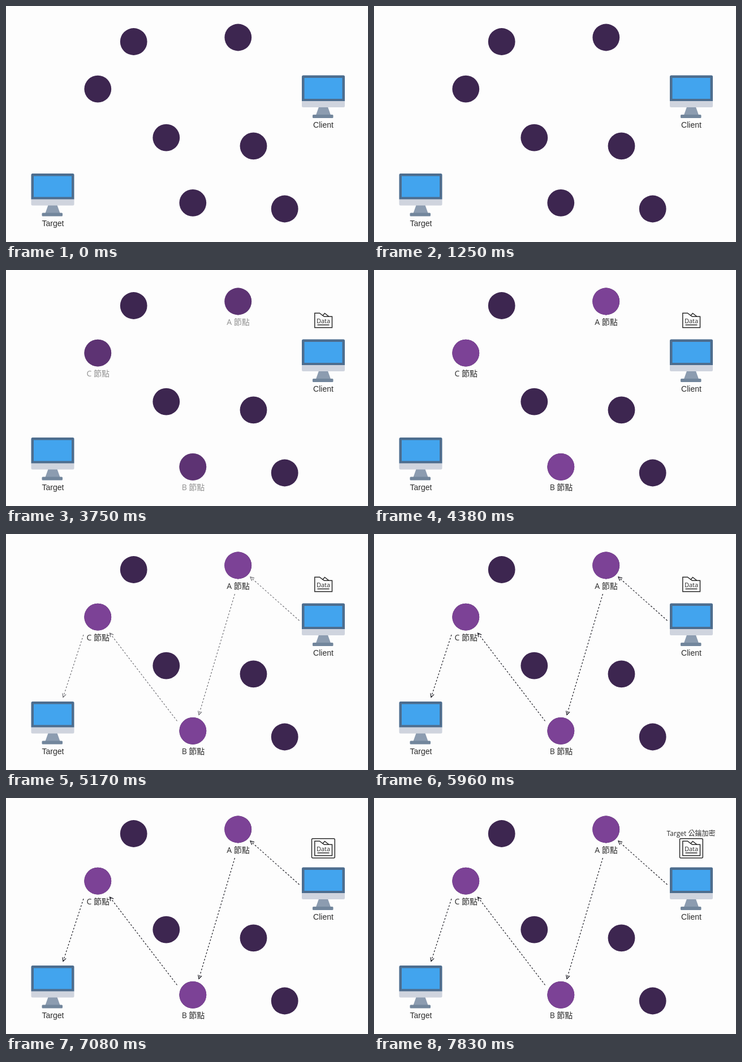
Recreate the animation shown at these times as an HTML page. Size 640 px wide and 417 px high, loop 8000 ms.

```html
<!DOCTYPE html>
<html lang="zh-Hant">
<head>
<meta charset="utf-8">
<title>Relay route</title>
<style>
  html, body { margin: 0; width: 100%; height: 100%; overflow: hidden; background: #fdfdfd; }
  svg { display: block; width: 100vw; height: 100vh; }
  text { fill: #2b2b2b; text-anchor: middle; }
  .host { font: 14px "Liberation Sans", Arial, sans-serif; }
  .node { font: 14px "Open Sans", "Noto Sans CJK TC", "Noto Sans CJK", sans-serif; }
  .key { font: 12px "Open Sans", "Noto Sans CJK TC", "Noto Sans CJK", sans-serif; }
  .data { font: 11px "Open Sans", sans-serif; }
  .line { fill: none; stroke: #2b2b2b; stroke-width: 1.5; }
  .route { fill: none; stroke: #1c1c24; stroke-width: 1.2; }
  .dash { stroke-dasharray: 3 3; }
  .idle { fill: #3d2650; }
  .chosen { fill: #7c4296; }

  .fade { animation: 8s linear infinite both; }
  .file { animation-name: file; }
  .relays { animation-name: relays; }
  .path { animation-name: path; }
  .wrap { animation-name: wrap; }
  .caption { animation-name: caption; }
  @keyframes file { 0%, 23.7% { opacity: 0 } 30.7%, 100% { opacity: 1 } }
  @keyframes relays { 0%, 43.3% { opacity: 0 } 50.3%, 100% { opacity: 1 } }
  @keyframes path { 0%, 60.3% { opacity: 0 } 67.3%, 100% { opacity: 1 } }
  @keyframes wrap { 0%, 76% { opacity: 0 } 83%, 100% { opacity: 1 } }
  @keyframes caption { 0%, 90.8% { opacity: 0 } 97.8%, 100% { opacity: 1 } }
</style>
</head>
<body>
<svg viewBox="0 0 640 417">
  <defs>
    <g id="computer">
      <path fill="#8c9cb0" d="M30 56H46L51 70H25Z"/>
      <rect fill="#72869c" x="19" y="69.5" width="36.5" height="6" rx="1.5"/>
      <path fill="#cfd4de" d="M0 45H76V54Q76 56.5 73.5 56.5H2.5Q0 56.5 0 54Z"/>
      <path fill="#4d6d8e" d="M0 45.5V2.5Q0 0 2.5 0H73.5Q76 0 76 2.5V45.5Z"/>
      <rect fill="#42a4ee" x="4.5" y="4.5" width="67" height="37"/>
    </g>
    <circle id="disc" r="23.9"/>
    <path id="head" class="route" d="M-6.5 -3.3L0 0L-6.5 3.3"/>
  </defs>

  <use href="#computer" x="523" y="122.5"/>
  <text class="host" x="561" y="215">Client</text>
  <use href="#computer" x="44.5" y="296"/>
  <text class="host" x="83" y="388.5">Target</text>

  <g class="idle">
    <use href="#disc" x="225.7" y="63"/>
    <use href="#disc" x="410.3" y="55.5"/>
    <use href="#disc" x="162.3" y="146.7"/>
    <use href="#disc" x="283.3" y="232.7"/>
    <use href="#disc" x="437.5" y="247.3"/>
    <use href="#disc" x="330.3" y="347.8"/>
    <use href="#disc" x="492.7" y="358.5"/>
  </g>

  <g class="fade relays">
    <g class="chosen">
      <use href="#disc" x="410.1" y="55.5"/>
      <use href="#disc" x="162.3" y="146.7"/>
      <use href="#disc" x="330.4" y="347.8"/>
    </g>
    <text class="node" x="410.5" y="97">A 節點</text>
    <text class="node" x="331" y="389">B 節點</text>
    <text class="node" x="162.7" y="188">C 節點</text>
  </g>

  <g class="fade path">
    <path class="route dash" d="M518.5 153L432 76M404.5 106L341 319.5M302.5 330.5L183.5 175M137 178L101 288.5"/>
    <use href="#head" transform="translate(432 76) rotate(221.7)"/>
    <use href="#head" transform="translate(341 319.5) rotate(106.6)"/>
    <use href="#head" transform="translate(183.5 175) rotate(232.6)"/>
    <use href="#head" transform="translate(101 288.5) rotate(108)"/>
  </g>

  <g class="fade file">
    <path class="line" d="M545.8 101.7V76.2H554.5L560 80.5L563.5 76.5L571 82.3H576.5V101.7ZM550.5 97H571.5M560 80.5L562.5 82.3H571"/>
    <text class="data" x="561" y="93.6">Data</text>
  </g>
  <rect class="line fade wrap" x="540.5" y="71.8" width="40.8" height="34.2" rx="2"/>
  <text class="key fade caption" x="560.5" y="66.5">Target 公鑰加密</text>
</svg>
</body>
</html>
```
